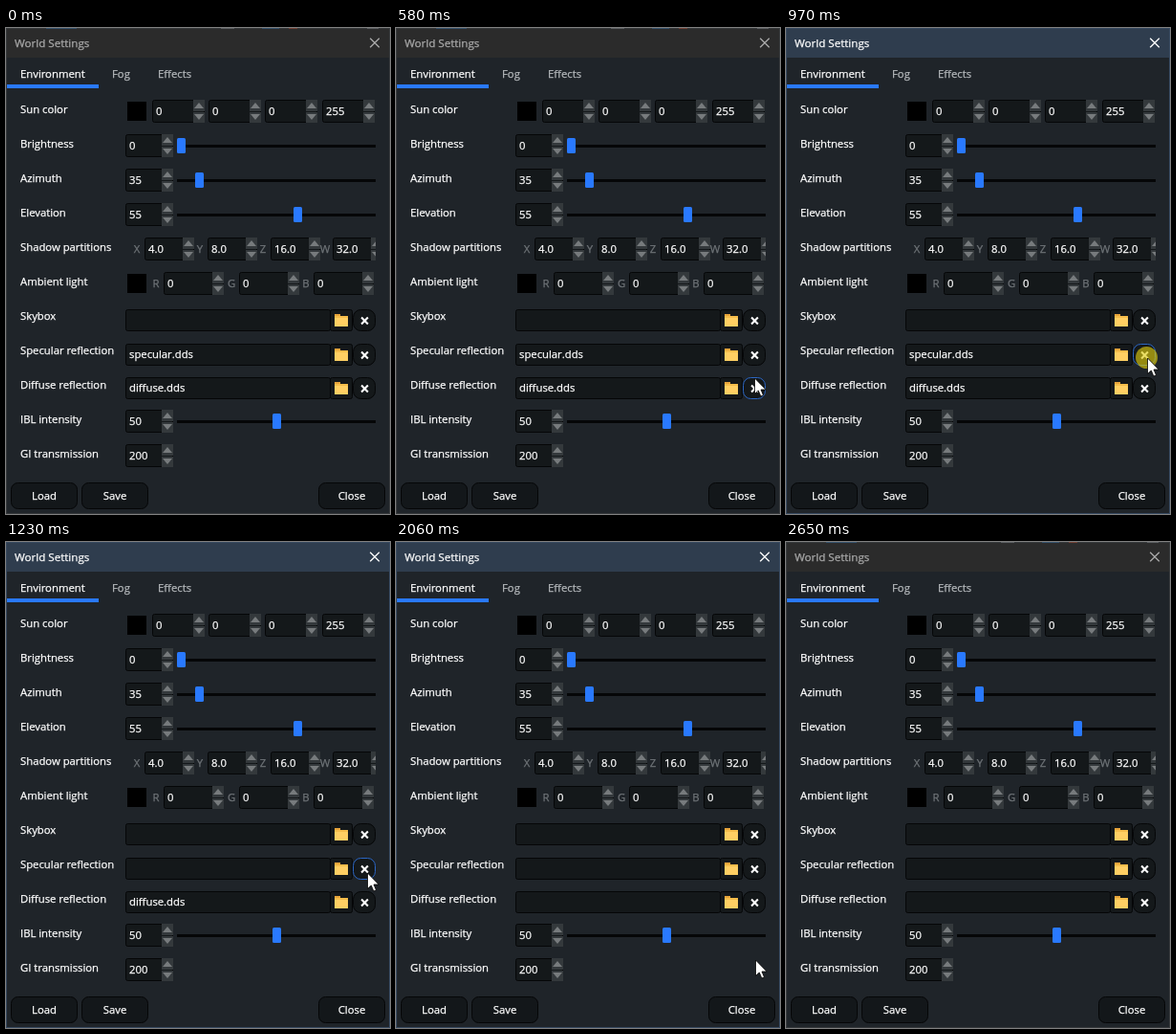
Animation of 402x508 px, one loop 2.75 s. Source, as an HTML page with a canvas:

```html
<!DOCTYPE html>
<html lang="en">
<head>
<meta charset="utf-8">
<title>World Settings</title>
<style>
html, body { margin: 0; width: 100%; height: 100%; overflow: hidden; background: #1f2429; }
canvas { display: block; }
</style>
</head>
<body>
<canvas id="stage" width="402" height="508"></canvas>
<script>
const ctx = document.getElementById('stage').getContext('2d', { alpha: false });
const LOOP = 2750, BLUE = '#2979ff', HOVER = '#2b66c4', FIELD = '#14181a', EDGE = '#050607';
const FONT = '"Open Sans", "Noto Sans", sans-serif';

// Cursor tip: [time, x, y]
const PATH = [
  [290, 361, 500], [320, 364, 472], [350, 367, 444], [380, 369, 421], [500, 373, 382],
  [620, 376, 358], [790, 378, 346], [820, 378, 345], [1220, 378, 345], [1290, 378, 353],
  [1410, 379, 373], [1500, 379, 379], [1530, 379, 380], [1880, 379, 380], [1970, 378, 402],
  [2060, 376, 437], [2150, 371, 465], [2240, 366, 485], [2350, 360, 508]
];
const PRESSES = [[970, 1070], [1730, 1830]];
const ACTIVE = [970, 2650];

const within = (t, [a, b]) => t >= a && t < b;

function cursorAt(t) {
  for (let i = 1; i < PATH.length; i++) {
    const [t0, x0, y0] = PATH[i - 1], [t1, x1, y1] = PATH[i];
    if (within(t, [t0, t1])) {
      const k = (t - t0) / (t1 - t0);
      return { x: Math.round(x0 + (x1 - x0) * k), y: Math.round(y0 + (y1 - y0) * k) };
    }
  }
  return null;
}

function rect(x, y, w, h, color) {
  ctx.fillStyle = color;
  ctx.fillRect(x, y, w, h);
}

function box(x, y, w, h, r, fill, stroke) {
  ctx.beginPath();
  ctx.roundRect(x + 0.5, y + 0.5, w - 1, h - 1, r);
  ctx.fillStyle = fill;
  ctx.fill();
  ctx.lineWidth = 1;
  ctx.strokeStyle = stroke;
  ctx.stroke();
}

// A hairline outline gives small type its full brightness
function text(s, x, y, color = '#fff', size = 11.3, align = 'left') {
  ctx.font = `${size}px ${FONT}`;
  ctx.textAlign = align;
  ctx.fillStyle = ctx.strokeStyle = color;
  ctx.lineWidth = 0.25;
  ctx.fillText(s, x, y);
  ctx.strokeText(s, x, y);
}

function poly(points, color) {
  ctx.beginPath();
  points.forEach(([x, y]) => ctx.lineTo(x, y));
  ctx.closePath();
  ctx.fillStyle = color;
  ctx.fill();
}

function cross(x, y, r, width, color) {
  ctx.beginPath();
  ctx.moveTo(x - r, y - r);
  ctx.lineTo(x + r, y + r);
  ctx.moveTo(x + r, y - r);
  ctx.lineTo(x - r, y + r);
  ctx.lineWidth = width;
  ctx.strokeStyle = color;
  ctx.stroke();
}

// Number field with up and down buttons, centred on y
function spin(x, y, w, value) {
  box(x, y - 12, w, 24, 2, FIELD, EDGE);
  text(value, x + 4, y + 4);
  const sx = x + w - 12, mid = sx + 6;
  rect(sx, y - 12, 12, 12, '#34393c');
  rect(sx, y + 1, 12, 11, '#34393c');
  poly([[mid - 5, y - 3], [mid, y - 9], [mid + 5, y - 3]], '#777b7d');
  poly([[mid - 5, y + 3], [mid, y + 9], [mid + 5, y + 3]], '#777b7d');
}

function slider(y, knob) {
  rect(179, y - 1, 208, 3, EDGE);
  ctx.beginPath();
  ctx.roundRect(knob - 4, y - 8, 9, 16, 1.5);
  ctx.fillStyle = BLUE;
  ctx.fill();
}

function swatch(y) {
  rect(127, y - 10, 20, 20, '#000');
}

function hit(p, x, y, w, h) {
  return p && p.x >= x && p.x < x + w && p.y >= y && p.y < y + h;
}

function fileRow(y, name, p) {
  const top = y - 12;
  box(125, top, 215, 23, 2, FIELD, EDGE);
  text(name, 129, y + 3);
  box(339, top, 24, 23, 2, FIELD, EDGE);
  rect(344, y - 7, 6, 4, '#e5a33a');
  rect(344, y - 5, 14, 11, '#f6bd4b');
  rect(344, y - 3, 14, 9, '#ffcf63');
  const over = hit(p, 363, top, 24, 23);
  box(363, top, 24, 23, 8, FIELD, over ? HOVER : EDGE);
  cross(375.5, y, 3.4, 2.1, '#fff');
}

function button(x, label, p) {
  const over = hit(p, x, 475, 70, 28);
  box(x, 475, 70, 28, 7, '#13171a', over ? HOVER : EDGE);
  text(label, x + 35, 493, '#fff', 11.3, 'center');
}

function arrow({ x, y }) {
  ctx.beginPath();
  [[0, 0], [0, 16.5], [3.8, 13], [6.4, 19], [9, 17.8], [6.5, 12], [11.7, 12]]
    .forEach(([dx, dy]) => ctx.lineTo(x + dx + 0.5, y + dy));
  ctx.closePath();
  ctx.fillStyle = '#fff';
  ctx.fill();
  ctx.lineWidth = 0.8;
  ctx.strokeStyle = '#000';
  ctx.stroke();
}

function titleBar(active) {
  rect(0, 0, 402, 31, active ? '#2f3d4e' : '#2b2b2b');
  const ink = active ? '#fff' : '#aaa';
  text('World Settings', 9, 20, ink, 11.6);
  cross(386, 15.5, 4.8, 1.3, ink);
  ctx.lineWidth = 1;
  ctx.strokeStyle = active ? '#35475e' : '#34373a';
  ctx.strokeRect(0.5, 0.5, 401, 507);
  if (!active) {
    [[42, 32, '#34506a'], [225, 14, '#5a5d60'], [268, 18, '#34506a'], [296, 9, '#704034'], [378, 12, '#5a5d60']]
      .forEach(([x, w, color]) => rect(x, 0, w, 1, color));
  }
}

function draw(t) {
  const p = cursorAt(t);
  rect(0, 0, 402, 508, '#1f2429');
  titleBar(within(t, ACTIVE));

  text('Environment', 15, 52);
  text('Fog', 111, 52, '#b5b9bc');
  text('Effects', 159, 52, '#b5b9bc');
  rect(1, 59, 96, 4, BLUE);

  ['Sun color', 'Brightness', 'Azimuth', 'Elevation', 'Shadow partitions', 'Ambient light',
   'Skybox', 'Specular reflection', 'Diffuse reflection', 'IBL intensity', 'GI transmission']
    .forEach((label, i) => text(label, 15, 89 + 36 * i));

  swatch(87);
  ['0', '0', '0', '255'].forEach((v, i) => spin(153 + Math.round(59.2 * i), 87, 55, v));

  [[123, '0', 183], [159, '35', 202], [195, '55', 305], [411, '50', 283]]
    .forEach(([y, v, knob]) => {
      spin(125, y, 50, v);
      slider(y, knob);
    });
  spin(125, 447, 50, '200');

  ctx.save();
  ctx.beginPath();
  ctx.rect(125, 215, 262, 32);
  ctx.clip();
  ['4.0', '8.0', '16.0', '32.0'].forEach((v, i) => {
    const x = 145 + Math.round(65.8 * i);
    text('XYZW'[i], x - 8, 235, '#6f7478', 11.3, 'center');
    spin(x, 231, 52, v);
  });
  ctx.restore();

  swatch(267);
  [...'RGB'].forEach((c, i) => {
    const x = 165 + Math.round(78.7 * i);
    text(c, x - 8, 271, '#6f7478', 11.3, 'center');
    spin(x, 267, 63, '0');
  });

  fileRow(306, '', p);
  fileRow(342, t < PRESSES[0][1] ? 'specular.dds' : '', p);
  fileRow(377, t < PRESSES[1][1] ? 'diffuse.dds' : '', p);

  button(5, 'Load', p);
  button(79, 'Save', p);
  button(327, 'Close', p);

  if (!p) return;
  if (PRESSES.some(span => within(t, span))) {
    ctx.beginPath();
    ctx.arc(p.x - 0.5, p.y - 0.5, 11.5, 0, 7);
    ctx.fillStyle = 'rgba(222, 204, 14, 0.64)';
    ctx.fill();
  }
  arrow(p);
}

const start = performance.now();
function tick() {
  draw((performance.now() - start) % LOOP);
  requestAnimationFrame(tick);
}
tick();
</script>
</body>
</html>
```
